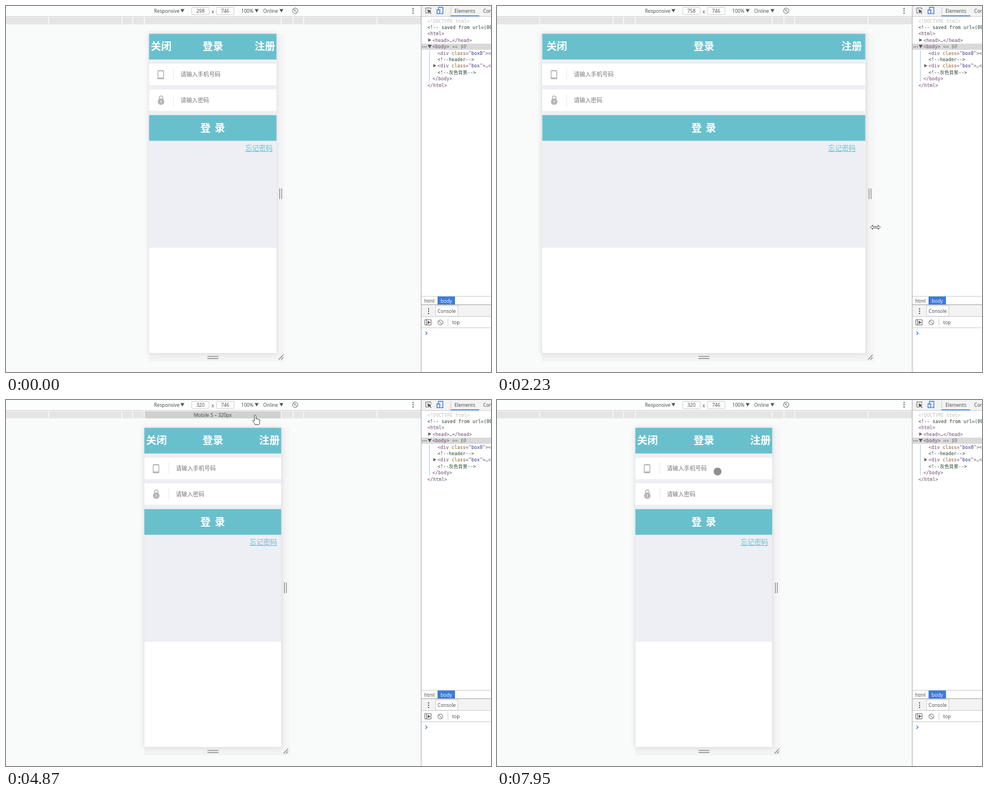
Animation, 862 px wide and 650 px high, one loop 8 s. Source, as an HTML page:

```html
<!DOCTYPE html>
<html lang="zh-CN">
<head>
<meta charset="utf-8">
<title>Responsive login page</title>
<style>
html, body { margin: 0; width: 100%; height: 100%; overflow: hidden; background: #f9fbfb; }
svg { display: block; width: 100vw; height: 100vh; }
text { font: 8.6px "Open Sans", "Noto Sans", sans-serif; fill: #444; white-space: pre; }
.mid { text-anchor: middle; }
.end { text-anchor: end; }
.white { fill: #fff; }
.teal { fill: #69c0cd; }
.grey { fill: #b5b5b5; }
.bar { fill: #f3f3f3; }
.line { stroke: #ccc; fill: none; }
.box { stroke: #ccc; fill: #fff; }
.icon { stroke: #666; fill: none; }
.solid { fill: #555; }
.blue { stroke: #3879d9; stroke-width: 1.3; fill: none; }
.grip { stroke: #8a8a8a; stroke-width: 1.3; fill: none; }
.code text { font: 8.3px "DejaVu Sans Mono", "Noto Sans CJK SC", monospace; fill: #6b4a70; }
.code .note { fill: #26452f; }
.code .faint { fill: #c0c0c0; }
.code .aside { fill: #777; font-style: italic; }
.code .attr { fill: #8a5a2a; }
.code .value { fill: #33338c; }
.page text { font: 10.15px "Noto Sans CJK SC", "Noto Sans CJK", sans-serif; fill: #757575; }
.page .title { font-size: 18.4px; font-weight: 900; fill: #fff; }
.page .link { font-size: 12.2px; fill: #69c0cd; }
#frame { fill: #fff; stroke: #dfdfe1; stroke-width: .8; filter: drop-shadow(0 0 4px rgba(0,0,0,.13)); }
#cursor path { fill: #fff; stroke: #333; stroke-width: .9; stroke-linejoin: round; }
</style>
</head>
<body>
<svg viewBox="0 0 862 650">
  <defs>
    <path id="caret" class="solid" d="M0 0h7l-3.5 6z"/>
    <path id="twisty" class="solid" d="M0 0l5 3-5 3z"/>
    <path id="dots" d="M0 0v10" stroke="#555" stroke-width="2" stroke-dasharray="2"/>
  </defs>
  <rect width="862" height="650" fill="#f9fbfb"/>

  <!-- device toolbar -->
  <rect width="738" height="18" fill="#fcfdfd"/>
  <path class="line" d="M0 18.5H738"/>
  <text x="263" y="12">Responsive</text><use href="#caret" x="310" y="5.5"/>
  <rect class="box" x="330" y="2.5" width="31" height="12.5" rx="1"/>
  <text class="mid" id="size" x="345.5" y="12"></text>
  <text class="mid" x="367.5" y="12.5">x</text>
  <rect class="box" x="374" y="2.5" width="31" height="12.5" rx="1"/>
  <text class="mid" x="389.5" y="12">746</text>
  <text x="418" y="12">100%</text><use href="#caret" x="442" y="5.5"/>
  <text x="457" y="12">Online</text><use href="#caret" x="486" y="5.5"/>
  <g class="icon"><circle cx="514" cy="8.5" r="4.8"/><path d="M510.5 5l7 7M512 9l3-3"/></g>
  <use href="#dots" x="723.5" y="3.5"/>

  <!-- preset ruler -->
  <rect y="20" width="738" height="12.5" fill="#e5e5e5"/>
  <rect id="hover" y="20" height="12.5" fill="#d0d0d0"/>
  <path id="marks" stroke="#fafafa" stroke-width="1.6"/>
  <text class="mid" id="label" x="367.5" y="30"></text>

  <!-- emulated device -->
  <rect id="column" y="49" width="15" height="582" fill="#f6f6f7"/>
  <rect id="base" class="bar" y="616" height="15"/>
  <path class="grip" d="M358 622.3h19.5M358 626h19.5"/>
  <path id="handles" class="grip" d="M5.7 324v19M9.3 324v19M4 628l8-8.5M8.5 628l3.5-4"/>
  <rect id="frame" y="49.4" height="567"/>
  <g class="page">
    <!-- drawn in page pixels -->
    <g id="bands">
      <rect height="746" class="white"/>
      <rect height="500" fill="#eeeff4"/>
      <rect height="60" class="teal"/>
      <rect y="70" height="50" class="white"/>
      <rect y="130" height="50" class="white"/>
      <rect y="190" height="60" class="teal"/>
    </g>
    <text class="title mid" x="367.8" y="78">登录</text>
    <text class="title mid" x="367.5" y="222.5" word-spacing="3">登 录</text>
    <text class="title" id="close" y="78">关闭</text>
    <text class="title end" id="join" y="78">注册</text>
    <g id="forgot"><text class="link end" y="256.5">忘记密码</text><path d="M-49 258.5H0" stroke="#69c0cd"/></g>
    <g id="fields">
      <path d="M43.5 111v21M43.5 157v21" stroke="#e9e9ec"/>
      <rect class="grey" x="15" y="114" width="11.5" height="16" rx="1.5"/>
      <rect class="white" x="16.5" y="116" width="8.5" height="11"/>
      <path d="M18 167v-4a3.2 3.2 0 0 1 6.4 0v4" fill="none" stroke="#b5b5b5" stroke-width="1.5"/>
      <circle class="grey" cx="21.2" cy="169.8" r="5.8"/>
      <path d="M21.2 167.5v4.5" stroke="#eee" stroke-width="1.5"/>
      <text x="56" y="125.3">请输入手机号码</text>
      <text x="56" y="171">请输入密码</text>
    </g>
  </g>

  <!-- inspector -->
  <rect class="white" x="738" width="124" height="650"/>
  <rect class="bar" x="738" width="124" height="18"/>
  <path class="line" d="M738 18.5h124M790.5 2v13M738 515.5h124"/>
  <path class="blue" d="M790 17.5h51"/>
  <path class="icon" d="M755 6.5v-3h-9v9h3.5"/>
  <path class="solid" d="M749 6l7.5 3-3 1 2.5 3-1.2 1-2.5-3-1.8 2.5z"/>
  <path class="blue" d="M768.5 7V2.5h8v11h-4M766 7h5v6.5h-5z"/>
  <text x="797" y="12">Elements</text>
  <text x="848" y="12">Console</text>
  <g class="code">
    <rect x="738" y="66.8" width="124" height="11" fill="#d9d9d9"/>
    <path d="M752.5 79v55" stroke="#a9c8ee"/>
    <use href="#twisty" x="750.5" y="57.5"/>
    <use href="#caret" x="749.5" y="69"/>
    <use href="#twisty" x="759.5" y="103"/>
    <path stroke="#666" stroke-width="1.7" stroke-dasharray="1.7 1.3" d="M740 72.5h8"/>
    <g id="tree"></g>
  </g>
  <text x="743.5" y="527">html</text>
  <rect x="767" y="516" width="31" height="14" fill="#3e7bdb"/>
  <text class="mid" x="782.5" y="527" style="fill:#fff">body</text>
  <rect class="bar" x="738" y="531" width="124" height="20"/>
  <rect class="box" x="763.5" y="532.5" width="39.5" height="18.5"/>
  <text class="mid" x="783.2" y="545">Console</text>
  <use href="#dots" x="751" y="537"/>
  <path class="line" d="M738 551.5h124M738 571.5h124M785.5 555v13"/>
  <path d="M738 530.5h124M738 0v650" stroke="#a3a3a3"/>
  <g class="icon"><path d="M744.5 557h11v9.5h-11zM747.5 557v9.5M769 559l6 6"/><circle cx="772" cy="562" r="4.3"/></g>
  <use href="#twisty" x="749.5" y="559"/>
  <text x="793" y="565">top</text>
  <path class="blue" d="M745.5 578.5l3 2.7-3 2.7"/>

  <g id="cursor">
    <path id="arrow" d="M0 0V12L2.8 9.6 4.7 13.8 6.5 13 4.7 9H8.7Z"/>
    <path id="resize" d="M-8.8 0L-4.8-4V-1.3H4.8V-4L8.8 0 4.8 4V1.3H-4.8V4Z"/>
    <path id="hand" d="M-1.5 10V1.3A1.4 1.4 0 0 1 1.3 1.3V6.3Q3.6 5.6 3.8 7Q6 6.3 6.2 7.8Q8 7.2 8 9V12Q8 14 6.5 16.7H-.5Q-1 14.5-3 12.5-5.2 9.6-4 9T-1.5 10Z"/>
    <circle id="touch" r="7" fill="#8f8f8f"/>
  </g>
</svg>
<script>
const LOOP = 8000, TICK = 77.25, PHASE = 15;
const SCALE = .76, CENTER = 367.5, TOP = 49.4;
const ENTER = 60, HOVER = 1140, GRAB = 1470, RELEASE = 3550;
const GRIP = 16.3, LAG = 18;

const presets = { 320: "Mobile S", 375: "Mobile M", 425: "Mobile L", 768: "Tablet" };
const clicks = [[4745, 320], [5450, 375], [6060, 768], [7450, 320]];

const easeOut = power => p => 1 - (1 - p) ** power;
const linear = easeOut(1), quad = easeOut(2), cubic = easeOut(3);

// Each move starts where the one before it ended.
const moves = [];
function move(start, end, x, y, ease = linear) {
  moves.push({ start, end, x, y, ease });
}
move(0, 0, 798, 640);
move(ENTER, 990, 497, 374, quad);
move(1070, 1300, 497, 381);
move(GRAB, 2300, 674, 393, quad);
move(2380, 3000, 566, 400, quad);
move(3070, 3472, 693, 412);
move(RELEASE, 3925, 453, 193);
move(4090, 4550, 443, 27);
move(4930, 5240, 496, 27);
move(5470, 5933, 533, 26);
move(5933, 6240, 616, 26);
move(6310, 7320, 487, 24, cubic);
move(7470, 7941, 392, 127);

const $ = id => document.getElementById(id);
const set = (el, attrs) => { for (const k in attrs) el.setAttribute(k, attrs[k]); };
const shift = (id, x, y = 0) => set($(id), { transform: `translate(${x} ${y})` });
const half = width => width * SCALE / 2;
const clamp = (v, lo, hi) => Math.min(Math.max(v, lo), hi);

function cursorAt(t) {
  let { x, y } = moves[0];
  for (const m of moves.slice(1)) {
    if (t < m.start) break;
    const p = m.ease(clamp((t - m.start) / (m.end - m.start), 0, 1));
    x += (m.x - x) * p;
    y += (m.y - y) * p;
  }
  return { x, y };
}

function cursorKind(t, y) {
  if (t < ENTER) return "";
  if (t < HOVER) return "arrow";
  if (t < RELEASE) return "resize";
  return y > TOP ? "touch" : y < 33 ? "hand" : "arrow";
}

// The width follows the dragged edge until a preset is clicked.
function widthAt(t) {
  const click = clicks.findLast(([time]) => t >= time);
  if (click) return click[1];
  const edge = cursorAt(clamp(t - LAG, GRAB, RELEASE)).x - GRIP;
  return 2 * (edge - CENTER) / SCALE;
}

function drawDevice(t) {
  const width = widthAt(t), h = half(width);
  const left = CENTER - h, right = CENTER + h;
  $("size").textContent = Math.round(width);
  set($("column"), { x: right });
  set($("base"), { x: left, width: 2 * h + 15 });
  set($("frame"), { x: left, width: 2 * h });
  shift("handles", right);

  const pageWidth = widthAt(t - LAG), w = pageWidth * SCALE;
  const pageLeft = CENTER - w / 2, pageRight = CENTER + w / 2;
  set($("bands"), { transform: `translate(${pageLeft} ${TOP}) scale(${SCALE})` });
  for (const band of $("bands").children) set(band, { width: pageWidth });
  shift("fields", pageLeft);
  shift("forgot", pageRight - .03 * w);
  set($("close"), { x: pageLeft + .013 * w });
  set($("join"), { x: pageRight - .01 * w });
}

function drawCursor(t) {
  const { x, y } = cursorAt(t), kind = cursorKind(t, y);
  shift("cursor", x, y);
  for (const el of $("cursor").children) el.style.display = el.id === kind ? "" : "none";

  const preset = kind === "hand" && Object.keys(presets).find(w => Math.abs(x - CENTER) <= half(w));
  const h = preset ? half(preset) : 0;
  set($("hover"), { x: CENTER - h, width: 2 * h });
  $("label").textContent = preset ? `${presets[preset]} – ${preset}px` : "";
}

function buildTree() {
  const lines = `
<!DOCTYPE html>
<!-- saved from url=(0014)
<html>
 <head>…</head>
 <body> == $0
  <div class="box0"></div>
  <!--header-->
  <div class="box">…</div>
  <!--灰色背景-->
 </body>
</html>`.trim().split("\n");
  const span = (name, text) => `<tspan class="${name}">${text}</tspan>`;
  $("tree").innerHTML = lines.map((line, i) => {
    const code = line.trim(), depth = line.length - code.length;
    const kind = code.startsWith("<!--") ? "note" : code.startsWith("<!") ? "faint" : "";
    const markup = code.replace(/</g, "&lt;").replace(/>/g, "&gt;")
      .replace(/class="(\w+)"/, `${span("attr", "class")}="${span("value", "$1")}"`)
      .replace(/ == .*/, span("aside", "$&"));
    return `<text class="${kind}" x="${749 + 9 * depth}" y="${29.5 + 11.41 * i}">${markup}</text>`;
  }).join("");
}

function buildMarks() {
  const tick = x => `M${x} 20v12.5`;
  set($("marks"), {
    d: Object.keys(presets).map(w => tick(CENTER - half(w)) + tick(CENTER + half(w))).join("")
  });
}

function frame() {
  const t = performance.now() % LOOP;
  const pose = Math.floor((t + PHASE) / TICK) * TICK - PHASE;
  drawDevice(pose);
  drawCursor(pose);
  requestAnimationFrame(frame);
}

buildTree();
buildMarks();
frame();
</script>
</body>
</html>
```
